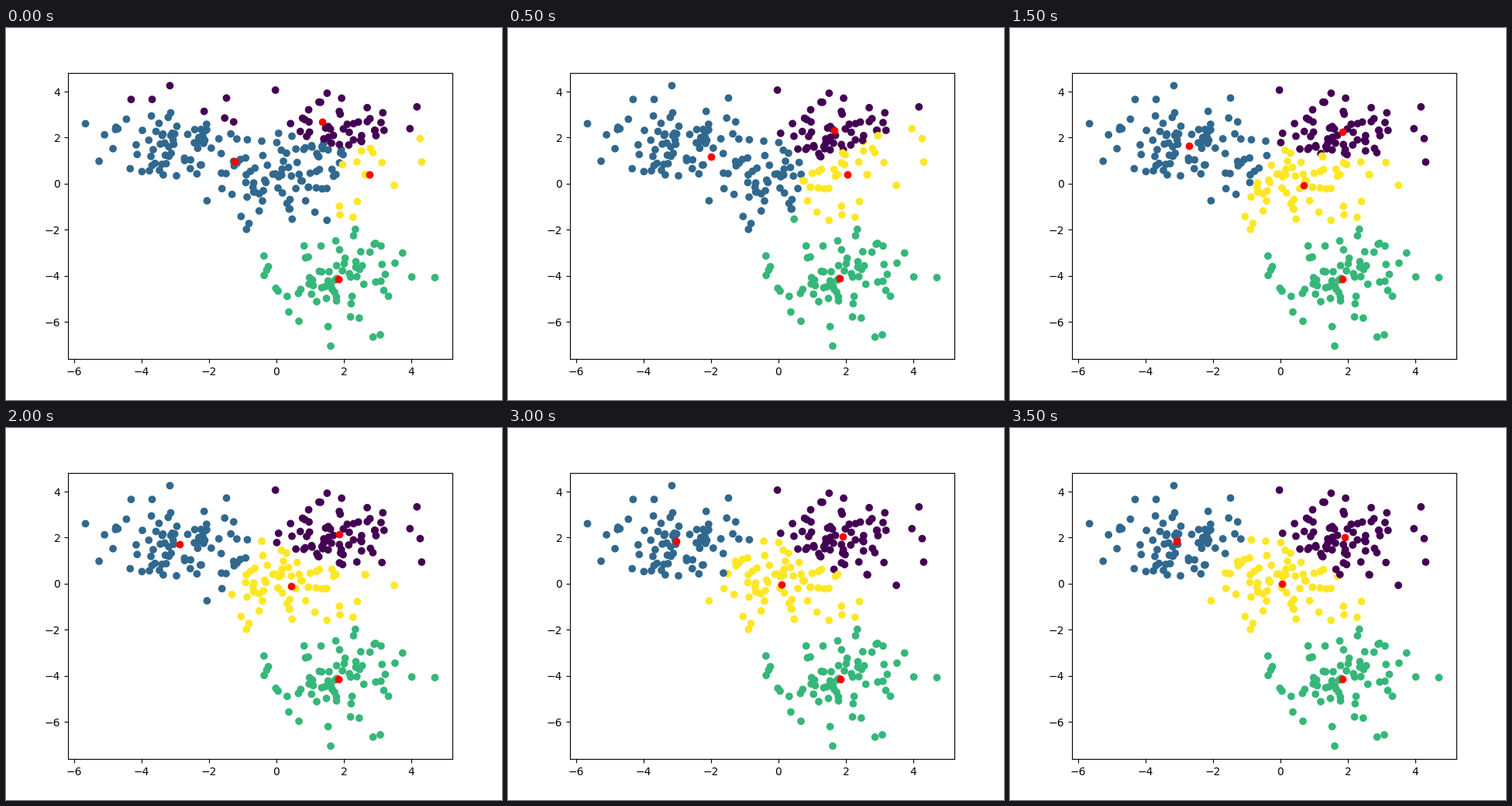
Animation, 640 px wide and 480 px high, one loop 4500 ms. Source, as a matplotlib script:

```python
import matplotlib.pyplot as plt
import numpy as np
from matplotlib.animation import FuncAnimation

STEPS = 8
FRAMES = 9
INTERVAL = 500  # ms


def make_blobs(centers, per_center=75, seed=0):
    """Shuffled unit-variance Gaussian blobs around the given centers."""
    rng = np.random.RandomState(seed)
    points = np.vstack([rng.normal(c, 1.0, (per_center, 2)) for c in centers])
    order = np.arange(len(points))
    rng.shuffle(order)
    return points[order]


def lloyd(points, means, steps):
    """Return (labels, means) after every assign-and-average step."""
    history = []
    for _ in range(steps):
        gaps = points[:, None, :] - means[None, :, :]
        labels = (gaps ** 2).sum(axis=2).argmin(axis=1)
        means = np.array([points[labels == k].mean(axis=0)
                          for k in range(len(means))])
        history.append((labels, means))
    return history


points = make_blobs([(0, 0), (2, 2), (-3, 2), (2, -4)])
start = np.array([(1.88946, 3.02017), (1.18664, 0.53358),
                  (1.85, -4.1), (2.62523, 0.39794)])
history = lloyd(points, start, STEPS)

fig, ax = plt.subplots(figsize=(6.4, 4.8), dpi=100)
labels, means = history[0]
dots = ax.scatter(*points.T, c=labels, cmap="viridis", vmin=0, vmax=3)
marks = ax.scatter(*means.T, c="r")


def update(frame):
    labels, means = history[min(frame, STEPS - 1)]
    dots.set_array(labels)
    marks.set_offsets(means)
    return dots, marks


anim = FuncAnimation(fig, update, frames=FRAMES, interval=INTERVAL,
                     repeat=True, repeat_delay=0)
plt.show()
```
